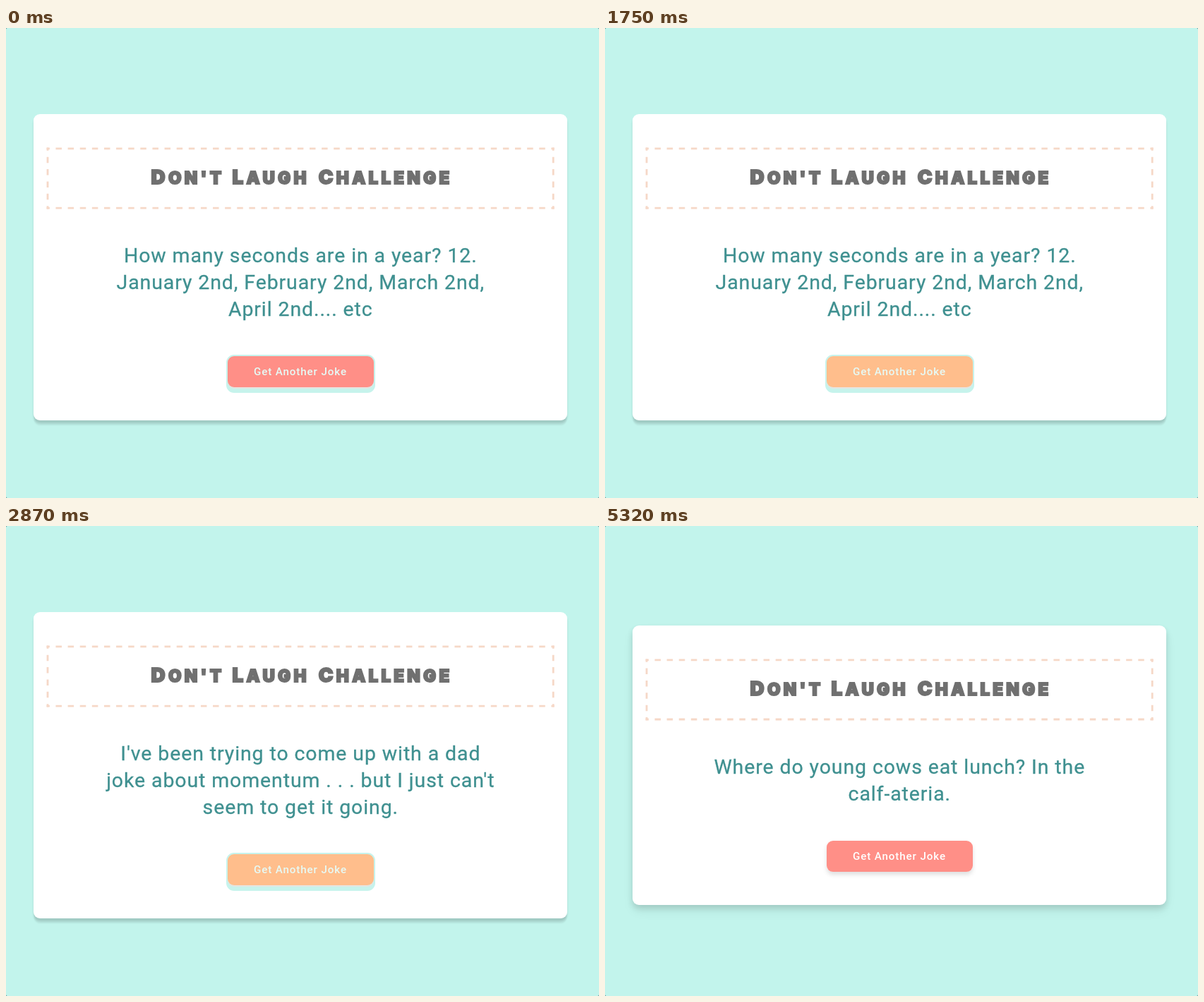
These frames come from a looping animation (840x666 px, 5600 ms). An HTML page:

```html
<!DOCTYPE html>
<html lang="en">
<head>
<meta charset="utf-8">
<title>Don't Laugh Challenge</title>
<style>
  html, body { margin: 0; width: 100%; height: 100%; overflow: hidden; background: #4d7478; }
  .stage {
    position: absolute; left: 0; top: 0; width: 840px; height: 666px;
    overflow: hidden; border-radius: 2px; background: #c2f4ec;
    font-family: Roboto, Arial, sans-serif;
    --loop: 5600ms;
  }
  .stage > * { position: absolute; }

  .card {
    left: 38.8px; width: 756.6px; top: 122.3px; height: 434px;
    border-radius: 9px; background: #fff;
    animation: card var(--loop) step-end infinite;
  }
  .head {
    left: 0; top: 0; width: 840px; height: 300px;
    animation: head var(--loop) step-end infinite;
  }
  .head line { stroke: #f6d8c7; stroke-width: 2.8; }
  .head .across { stroke-dasharray: 8.5 8.62; stroke-dashoffset: 4.25; }
  .head .down { stroke-dasharray: 8.5 8.88; stroke-dashoffset: 4.25; }
  .head text {
    font: 900 24px Inter, Roboto, sans-serif; letter-spacing: 4.3px;
    text-anchor: middle; fill: #707070; stroke: #707070; stroke-width: 2;
  }
  .head .cap { font-size: 27.8px; }

  .joke {
    left: 0; width: 834.6px; top: 304px; opacity: 0;
    font-size: 28.45px; line-height: 38px; letter-spacing: .92px;
    text-align: center; white-space: nowrap;
    color: #3f9090; -webkit-text-stroke: .3px #3f9090;
    animation: var(--loop) step-end infinite;
  }
  .joke.short { top: 323px; }
  .first { animation-name: first; }
  .second { animation-name: second; }
  .third { animation-name: third; }
  .fourth { animation-name: fourth; }

  .halo {
    left: 311.5px; top: 463px; width: 211px; height: 53.5px;
    border-radius: 11px; background: #c6f3ec;
    animation: halo var(--loop) step-end infinite;
  }
  .button {
    left: 313.5px; top: 464.5px; width: 207px; height: 44.6px;
    border-radius: 9px;
    animation: button var(--loop) step-end infinite;
  }
  .fill {
    height: 100%; border-radius: 9px;
    font-size: 15.15px; font-weight: 500; line-height: 44.6px; letter-spacing: .9px;
    text-align: center; white-space: nowrap;
    animation: hover var(--loop) ease-in-out infinite;
  }

  /* Two-line jokes make the card shorter. */
  @keyframes card {
    0%, 48.75% {
      top: 122.3px; height: 434px;
      box-shadow: 0 4px 3px rgba(0, 0, 0, .12), 0 8px 2px -1px rgba(0, 0, 0, .06);
    }
    33.75%, 75%, 100% {
      top: 141.2px; height: 396.3px;
      box-shadow: 0 5px 9px rgba(0, 0, 0, .12), 0 9px 16px rgba(0, 0, 0, .06);
    }
  }
  @keyframes head {
    0%, 48.75% { transform: none; }
    33.75%, 75%, 100% { transform: translateY(18.9px); }
  }
  @keyframes halo {
    0%, 48.75% { opacity: 1; }
    33.75%, 75%, 100% { opacity: 0; }
  }
  @keyframes button {
    0%, 48.75% { transform: none; color: #e6faf5; box-shadow: 0 2px 1px #e6e4e0; }
    33.75%, 75%, 100% {
      transform: translateY(-18.9px); color: #fff;
      box-shadow: 0 4px 6px rgba(0, 0, 0, .13);
    }
  }
  @keyframes first { 0% { opacity: 1; } 33.75%, 100% { opacity: 0; } }
  @keyframes second { 0%, 48.75%, 100% { opacity: 0; } 33.75% { opacity: 1; } }
  @keyframes third { 0%, 75%, 100% { opacity: 0; } 48.75% { opacity: 1; } }
  @keyframes fourth { 0% { opacity: 0; } 75%, 100% { opacity: 1; } }

  /* The pointer enters and leaves three times, 400 ms per fade. */
  @keyframes hover {
    0%, 15.893%, 39.107%, 42.321%, 60.536%, 65%, 87.857%, 100% { background: #ff8f87; }
    23.036%, 31.964%, 49.464%, 53.393%, 72.143%, 80.714% { background: #ffbe8c; }
  }
</style>
</head>
<body>
<div class="stage">
  <div class="card"></div>
  <svg class="head" viewBox="0 0 840 300">
    <line class="across" x1="57.6" x2="776.6" y1="170.9" y2="170.9"/>
    <line class="across" x1="57.6" x2="776.6" y1="255.1" y2="255.1"/>
    <line class="down" x1="59" x2="59" y1="169.5" y2="256.4"/>
    <line class="down" x1="775.2" x2="775.2" y1="169.5" y2="256.4"/>
    <text x="257.6" y="221.2"><tspan class="cap">D</tspan>ON'T</text>
    <text x="375.2" y="221.2"><tspan class="cap">L</tspan>AUGH</text>
    <text x="537.6" y="221.2"><tspan class="cap">C</tspan>HALLENGE</text>
  </svg>
  <div class="joke first">How many seconds are in a year? 12.<br>January 2nd, February 2nd, March 2nd,<br>April 2nd.... etc</div>
  <div class="joke second short">What do you call a nervous javelin<br>thrower? Quavershade.</div>
  <div class="joke third">I've been trying to come up with a dad<br>joke about momentum . . . but I just can't<br>seem to get it going.</div>
  <div class="joke fourth short">Where do young cows eat lunch? In the<br>calf-ateria.</div>
  <div class="halo"></div>
  <div class="button"><div class="fill">Get Another Joke</div></div>
</div>
</body>
</html>
```
